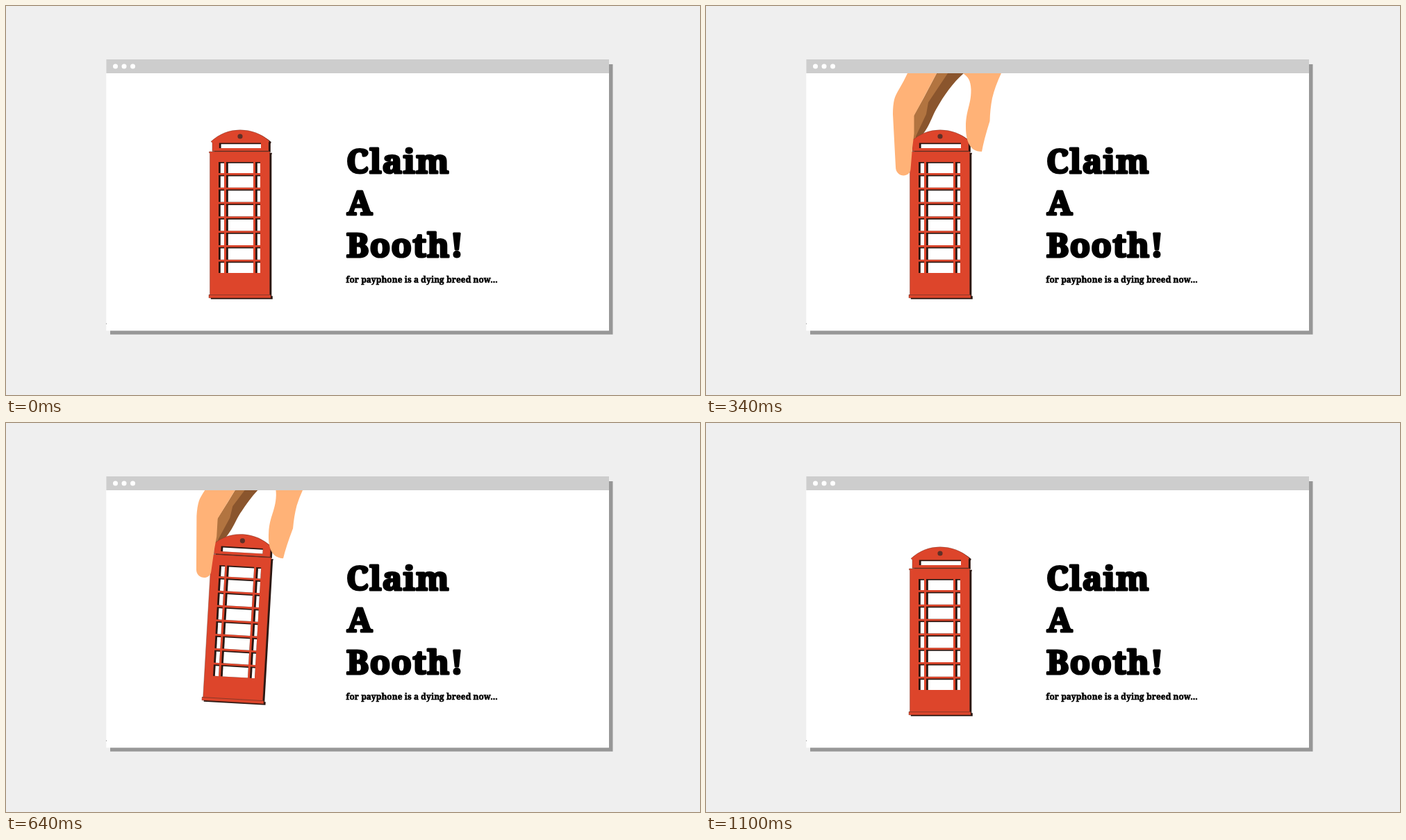
Recreate the animation shown at these times as an HTML page. Size 999 px wide and 561 px high, loop 1120 ms.

```html
<!DOCTYPE html>
<html lang="en">
<head>
<meta charset="utf-8">
<title>Claim A Booth!</title>
<style>
  html, body { margin: 0; width: 100%; height: 100%; overflow: hidden; background: #efefef; }
  svg { display: block; width: 100%; height: 100%; }
  text { font-family: "Noto Serif", "Liberation Serif", serif; stroke: #000; stroke-linejoin: round; }
  .title { font-size: 48px; font-weight: 900; stroke-width: 3.2px; letter-spacing: .03em; }
  .note { font-size: 11.8px; font-weight: 700; stroke-width: .6px; letter-spacing: .008em; }
</style>
</head>
<body>
<svg viewBox="0 0 999 561">
  <defs>
    <clipPath id="page"><rect x="144" y="97" width="724" height="371"/></clipPath>
    <g id="shell">
      <path d="M295 195.500Q313 178.800 337 178.800Q361 178.800 379 194.500L378 197V209H297V197Z"/>
      <path d="M292.500 210H380V212H379.500V416.500H381V421H292V416.500H293.500V212H292.500Z"/>
    </g>
  </defs>

  <rect x="150" y="84" width="723.500" height="389.700" fill="#979797"/>
  <rect x="144.300" y="77" width="723.700" height="391.300" fill="#fff"/>
  <rect x="144.300" y="77" width="723.700" height="20" fill="#cdcdcd"/>
  <rect x="144" y="457.500" width="1" height="1.500" fill="#aaa"/>
  <g fill="#fff">
    <circle cx="157.500" cy="87" r="3.500"/>
    <circle cx="170" cy="87" r="3.500"/>
    <circle cx="182.500" cy="87" r="3.500"/>
  </g>

  <text class="title" x="490" y="240.500">Claim</text>
  <text class="title" x="491" y="300.500">A</text>
  <text class="title" x="490" y="361.500">Booth!</text>
  <text class="note" x="489.500" y="398.500">for payphone is a dying breed now...</text>

  <g clip-path="url(#page)">
    <g id="lifted">
      <g id="palm">
        <path fill="#b27440" d="M336 90L332 97L313 133L299 158L297 196H306L325 150L352 90Z"/>
        <path fill="#8a552d" d="M352 90L348 97L320 139L317 156L302 188V196C322 178 324 160 333 146C342 130 355 111 371 97L378 90Z"/>
      </g>
      <use href="#shell" x="2.800" y="1.700" fill="#2a1611"/>
      <use href="#shell" fill="#dd452b" stroke="#6b3427" stroke-width=".4"/>
      <path d="M292 416.700H381M297 209.500H379" stroke="#6b3427" stroke-width=".7"/>
      <circle cx="337" cy="188" r="3.600" fill="#5e3027"/>
      <g id="panes"></g>
      <g id="fingers" fill="#ffb277">
        <path d="M294 90L290 97C283 113 273 126 271 135Q269 143 269 156L273 232C273 248 294 248 294.500 235L297 205L299.500 184V158L313 133L332 97L336 90Z"/>
        <path d="M365 90L370 97C377 102 381 107 381.500 120C382 142 374 150 374 174C374 192 378 210 397 210Q400 193 408.500 166Q409 148 412 133Q416 116 425 97L428 90Z"/>
      </g>
    </g>
  </g>
</svg>
<script>
const LOOP = 1120, TICK = 20;
const PIVOT = { x: 337, y: 179 };
const REST = { x: 0, y: 0, angle: 0 };
const RAISED = { x: 0, y: -13.4, angle: 1.9 };
const TILTED = { x: 14, y: -30.4, angle: 7 };

const byId = id => document.getElementById(id);
const lifted = byId("lifted");
const hand = [byId("palm"), byId("fingers")];

const progress = (t, from, to) => Math.min(1, Math.max(0, (t - from) / (to - from)));
const easeOut = u => 1 - (1 - u) ** 2;
const easeInOut = u => u < .5 ? 2 * u * u : 1 - 2 * (1 - u) ** 2;
const mix = (a, b, u) => a + (b - a) * u;

function addRect(x, y, right, bottom, fill) {
  const rect = document.createElementNS("http://www.w3.org/2000/svg", "rect");
  const attrs = { x, y, width: right - x, height: bottom - y, fill };
  for (const key in attrs) rect.setAttribute(key, attrs[key]);
  byId("panes").append(rect);
}

// A hole in the shell: its dark inner edge, then the page showing through.
function addPane(left, top, right, bottom) {
  addRect(left, top, right, bottom, "#2a1611");
  addRect(left + 2.8, top + 1.7, right, bottom, "#fff");
}

function buildPanes() {
  addPane(306.8, 197.5, 367, 205);
  for (let row = 0; row < 8; row++) {
    const top = row ? 223 + row * 20.8 : 225;
    const bottom = row < 7 ? 241 + row * 20.8 : 385;
    for (const [left, right] of [[306, 314], [317, 356], [359, 366]])
      addPane(left, top, right, bottom);
  }
}

function poseAt(t) {
  if (t >= 920) return REST;
  const tilting = t >= 580;
  const [from, to] = tilting ? [RAISED, TILTED] : [REST, RAISED];
  const u = easeInOut(tilting ? progress(t, 580, 740) : progress(t, 400, 540));
  return {
    x: mix(from.x, to.x, u),
    y: mix(from.y, to.y, u),
    angle: mix(from.angle, to.angle, u)
  };
}

function draw(time) {
  const t = Math.floor(time % LOOP / TICK) * TICK;
  const { x, y, angle } = poseAt(t);
  lifted.setAttribute("transform", `translate(${x} ${y}) rotate(${angle} ${PIVOT.x} ${PIVOT.y})`);

  const visible = t > 200 && t < 920;
  const drop = mix(-150, 0, easeOut(progress(t, 200, 340)));
  for (const part of hand) {
    part.setAttribute("visibility", visible ? "visible" : "hidden");
    part.setAttribute("transform", `translate(0 ${drop})`);
  }
}

buildPanes();
const start = performance.now();
function frame() {
  draw(performance.now() - start);
  requestAnimationFrame(frame);
}
frame();
</script>
</body>
</html>
```
